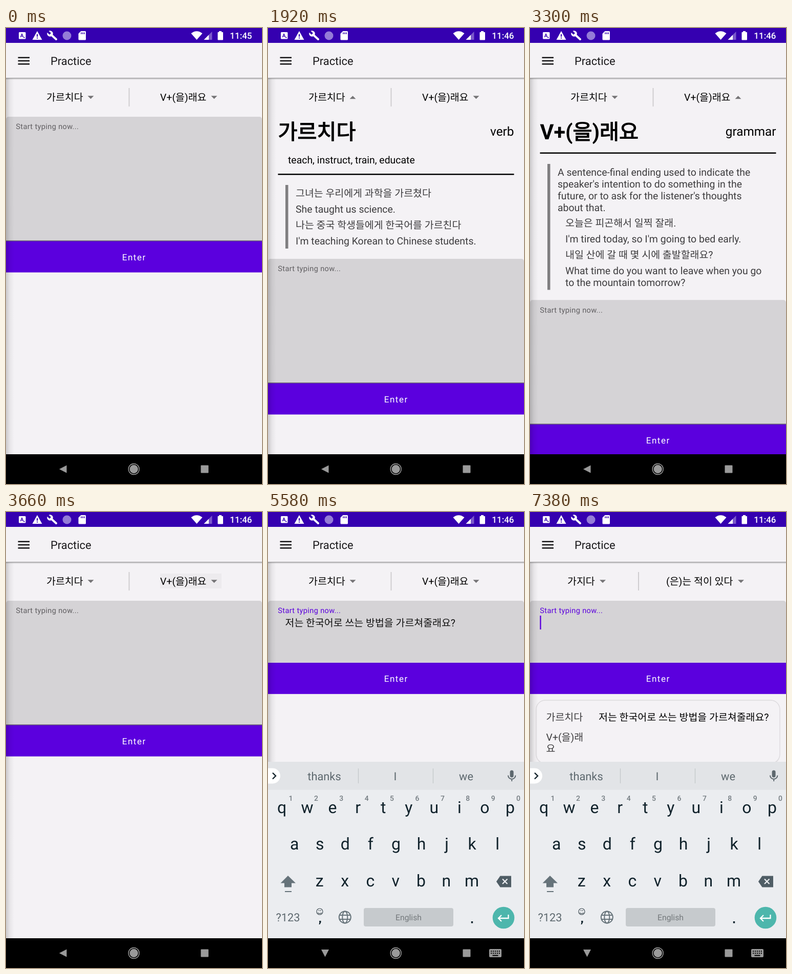
An HTML page that plays this animation: 500 px wide and 889 px high, repeating every 7440 ms.

```html
<!DOCTYPE html>
<html lang="ko">
<head>
<meta charset="utf-8">
<title>Practice</title>
<style>
  html, body { margin: 0; width: 100%; height: 100%; overflow: hidden; background: #f4f2f5; }
  svg { display: block; width: 500px; height: 889px; }
  text { font-family: Roboto, "Noto Sans CJK KR", "Noto Sans CJK", sans-serif; font-size: 19.44px;
         white-space: pre; text-rendering: geometricPrecision; }
  .head { font-size: 41.3px; font-weight: 700; }
  .head .ko { font-weight: 400; stroke: #000; stroke-width: 1.25px; }
  .kind { font-size: 24.3px; text-anchor: end; }
  .soft { fill: #3d3c3e; }
  .label { font-size: 14.58px; letter-spacing: .35px; }
  .enter { font-size: 17px; letter-spacing: 1.5px; fill: #fff; }
  .mid { text-anchor: middle; }
  .key { font-size: 32px; fill: #10222b; }
  .hint { font-size: 14px; font-weight: 500; fill: #737b80; }
  .word { font-size: 21.8px; fill: #5d686e; }
</style>
</head>
<body>
<svg viewBox="0 0 500 889" xmlns="http://www.w3.org/2000/svg">
  <defs>
    <linearGradient id="edge">
      <stop offset="0" stop-color="#000" stop-opacity=".17"/>
      <stop offset=".5" stop-color="#000" stop-opacity=".05"/>
      <stop offset="1" stop-color="#000" stop-opacity="0"/>
    </linearGradient>
    <linearGradient id="drop" x2="0" y2="1">
      <stop offset="0" stop-color="#000" stop-opacity=".36"/>
      <stop offset="1" stop-color="#000" stop-opacity="0"/>
    </linearGradient>
    <pattern id="dots" width="2" height="2" patternUnits="userSpaceOnUse">
      <rect width="2" height="2" fill="#8468d0"/>
      <rect width="1" height="1" fill="#c5b6ec"/>
    </pattern>
    <clipPath id="btnClip"><rect y="416" width="500" height="60.5"/></clipPath>
  </defs>

  <rect width="500" height="889" fill="#f4f2f5"/>

  <!-- selectors -->
  <rect id="tapL" x="79" y="120" width="101" height="29" fill="#000" opacity="0"/>
  <rect id="tapR" x="301" y="120" width="120" height="29" fill="#000" opacity="0"/>
  <text id="pickL" y="142"></text>
  <text id="pickR" y="142"></text>
  <path id="arrowL" d="M-6-3H6L0 3Z" fill="#757476"/>
  <path id="arrowR" d="M-6-3H6L0 3Z" fill="#757476"/>
  <rect id="split" y="117" width="2" height="36" fill="#cfcdd0"/>

  <g id="verb">
    <text class="head" x="19.5" y="216.5"><tspan class="ko">가르치다</tspan></text>
    <text class="kind" x="480.5" y="210">verb</text>
    <text x="39" y="264">teach, instruct, train, educate</text>
    <rect x="19.5" y="284" width="461" height="2.5"/>
    <rect x="34" y="306" width="5.5" height="124" fill="#807f81"/>
    <g class="soft" id="verbLines"></g>
  </g>

  <g id="grammar">
    <text class="head" x="19.5" y="216.5">V+(<tspan class="ko">을</tspan>)<tspan class="ko">래요</tspan></text>
    <text class="kind" x="480.5" y="210">grammar</text>
    <rect x="19.5" y="242.5" width="461" height="2.5"/>
    <rect x="34" y="265" width="5.5" height="245.5" fill="#807f81"/>
    <g class="soft" id="grammarLines"></g>
  </g>

  <!-- answer card -->
  <g id="card">
    <rect x="12" y="368" width="476" height="124" rx="18" fill="#000" opacity=".07"/>
    <rect x="12" y="367" width="476" height="123" rx="18" fill="#f4f2f5" stroke="#dddbde" stroke-width="1.4"/>
    <g class="soft">
      <text x="31.5" y="407">가르치다</text>
      <text x="31.5" y="446">V+(을)래</text>
      <text x="31.5" y="468">요</text>
    </g>
    <text x="134" y="407" id="answer"></text>
  </g>

  <!-- input and button -->
  <g id="field">
    <path id="box" fill="#d5d3d6"/>
    <rect id="rule" y="414" width="500" height="1.8" fill="#7b797c"/>
    <text class="label" id="label" x="19.3" y="197.3">Start typing now...</text>
    <text id="typed" x="33.5" y="222.5" fill="#111"></text>
    <rect id="caret" y="202" width="2.4" height="27" fill="#5b00dd"/>
  </g>
  <g id="button">
    <rect y="415.5" width="500" height="61" fill="#5b00de"/>
    <rect y="415.5" width="500" height="1" fill="#000" opacity=".15"/>
    <g clip-path="url(#btnClip)"><circle id="ripple" cx="250" cy="446" fill="#fff" opacity="0"/></g>
    <text class="enter" x="226.8" y="453">Enter</text>
  </g>

  <rect y="98" width="16" height="733" fill="url(#edge)"/>

  <!-- toolbar -->
  <rect y="97" width="500" height="4" fill="url(#drop)"/>
  <rect y="29" width="500" height="68" fill="#f4f2f5"/>
  <path d="M23.5 57.7H46M23.5 64H46M23.5 70.3H46" stroke="#151416" stroke-width="2.4"/>
  <text x="87" y="72" style="font-size:21.87px" fill="#1a191b">Practice</text>

  <!-- keyboard -->
  <g id="keys">
    <rect y="487" width="500" height="344" fill="#ebedf0"/>
    <rect y="487" width="500" height="54.5" fill="#e2e4e7"/>
    <path d="M0 499.5H9a15 15 0 0 1 0 30H0Z" fill="#fff"/>
    <path d="M9 508.500l6 6-6 6" fill="none" stroke="#15252d" stroke-width="2.4"/>
    <path d="M176.500 500V529M322.500 500V529" stroke="#c3c7ca" stroke-width="1.3"/>
    <g class="word mid">
      <text x="110" y="523" style="font-size:inherit">thanks</text>
      <text x="248.500" y="523" style="font-size:inherit">I</text>
      <text x="387" y="523" style="font-size:inherit">we</text>
      <text x="39" y="798" style="font-size:inherit">?123</text>
    </g>
    <rect x="472.600" y="503.500" width="7" height="14" rx="3.500" fill="#5d686e"/>
    <path d="M469 513.500a7.200 7.200 0 0 0 14.400 0M476.200 521V525" fill="none" stroke="#5d686e" stroke-width="2"/>
    <g id="letters"></g>
    <path d="M39 709L54 723.500H46V731.500H32V723.500H24.500Z" fill="#66737a"/>
    <rect x="33" y="739" width="13" height="2" fill="#66737a"/>
    <path d="M453.500 709.500H475V731.500H453.500L446 720.500Z" fill="#4f5d65"/>
    <path d="M458 715.500l9.500 9.500M467.500 715.500l-9.500 9.500" stroke="#ebedf0" stroke-width="2.300"/>
    <g fill="none" stroke="#3f4c53" stroke-width="1.200">
      <circle cx="101" cy="779" r="6"/>
      <path d="M97.500 781a3.800 3.200 0 0 0 7 0"/>
    </g>
    <path d="M98.800 776.200h1.500v1.700h-1.500zM102 776.200h1.500v1.700h-1.500z" fill="#3f4c53"/>
    <path d="M100 797h3.500v3l-2.200 4h-1.800l.9-3.500z" fill="#10222b"/>
    <g fill="none" stroke="#66737a" stroke-width="2">
      <circle cx="150.300" cy="790" r="11.500"/>
      <ellipse cx="150.300" cy="790" rx="5" ry="11.500"/>
      <path d="M140 786H160.600M140 794H160.600"/>
    </g>
    <rect x="187" y="772" width="175" height="36" rx="4" fill="#c6cacd"/>
    <text class="mid" x="274.500" y="796" style="font-size:15.8px" fill="#74797c">English</text>
    <rect x="396.800" y="798" width="3.400" height="3.600" fill="#10222b"/>
    <circle cx="460" cy="791" r="21.300" fill="#4db6ac"/>
    <path d="M469.500 785V792H450.500M456 786l-6 6 6 6" fill="none" stroke="#fff" stroke-width="2.300"/>
  </g>

  <!-- navigation bar -->
  <rect y="831" width="500" height="58" fill="#000"/>
  <path id="back" d="M104 860L118.500 852.500V867.500Z" fill="#9a9a9a"/>
  <circle cx="249.700" cy="860" r="8.200" fill="#9a9a9a"/>
  <circle cx="249.700" cy="860" r="10.500" fill="none" stroke="#a6a6a6" stroke-width="1.300"/>
  <rect x="380.500" y="852.500" width="15" height="15" rx="1" fill="#9a9a9a"/>
  <g id="navKeys">
    <rect x="432" y="852" width="24" height="16" rx="2" fill="#9a9a9a"/>
    <path d="M435 856.300H453M435 860.200H453" stroke="#000" stroke-width="2" stroke-dasharray="2.200 1.750"/>
    <path d="M438.500 864.600H449.500" stroke="#000" stroke-width="2"/>
  </g>

  <!-- status bar -->
  <rect width="500" height="29" fill="#3500b0"/>
  <rect x="25" y="8" width="13.500" height="13.500" rx="1.500" fill="#fff"/>
  <text class="mid" x="31" y="18" style="font-size:10px;font-weight:700" fill="#3500b0">A</text>
  <path d="M34 18.500h3" stroke="#3500b0" stroke-width="1.300"/>
  <path d="M61 6L70.500 23H51.500Z" fill="#fff"/>
  <path d="M61 12V17M61 18.500V20.500" stroke="#3500b0" stroke-width="2"/>
  <path d="M87 12L98 22" stroke="#fff" stroke-width="4" stroke-linecap="round"/>
  <circle cx="86" cy="11" r="5.800" fill="#fff"/>
  <path d="M79 7.500L82 4.500L88 10L85 13Z" fill="#3500b0"/>
  <circle cx="119" cy="15" r="8.500" fill="url(#dots)"/>
  <path d="M146.500 6H154.500a1.500 1.500 0 0 1 1.500 1.500V22a1.500 1.500 0 0 1-1.500 1.500H143a1.500 1.500 0 0 1-1.500-1.500V11Z" fill="#fff"/>
  <path d="M147 8.500V12M150 8.500V12M153 8.500V12" stroke="#3500b0" stroke-width="1.500"/>
  <path d="M361.500 10.500Q372.500 2 383.500 10.500L372.500 23Z" fill="#fff"/>
  <path d="M402.500 7V23H386.500Z" fill="#fff" opacity=".35"/>
  <path d="M396 13.500V23H386.500Z" fill="#fff"/>
  <path d="M416 6H421V8H423a1 1 0 0 1 1 1V22.500a1 1 0 0 1-1 1H414.500a1 1 0 0 1-1-1V9a1 1 0 0 1 1-1H416Z" fill="#fff"/>
  <text id="clock" x="480.500" y="21" text-anchor="end" style="font-size:17px;font-weight:500" fill="#fff"></text>
</svg>

<script>
const LOOP = 7440, STEP = 60;
const SENTENCE = "저는 한국어로 쓰는 방법을 가르쳐줄래요?";
const AT = {
  clock: 720, verbOpen: 1200, verbShut: 2100, gramOpen: 2220, gramShut: 3480,
  focus: 4140, keysUp: 4260, type: 4680, typed: 5340, press: 6060, commit: 6240
};

const $ = id => document.getElementById(id);
const set = (id, attrs) => { for (const k in attrs) $(id).setAttribute(k, attrs[k]); };
const show = (id, on) => { $(id).style.display = on ? "" : "none"; };
const write = (id, s) => { if ($(id).textContent !== s) $(id).textContent = s; };
const clamp = v => Math.max(0, Math.min(1, v));
const line = ([x, y, s]) => `<text x="${x}" y="${y}">${s}</text>`;

$("verbLines").innerHTML = [
  [54, 329, "그녀는 우리에게 과학을 가르쳤다"],
  [54, 360, "She taught us science."],
  [54, 391, "나는 중국 학생들에게 한국어를 가르친다"],
  [54, 422, "I'm teaching Korean to Chinese students."]
].map(line).join("");

$("grammarLines").innerHTML = [
  [54, 288, "A sentence-final ending used to indicate the"],
  [54, 311, "speaker's intention to do something in the"],
  [54, 333.7, "future, or to ask for the listener's thoughts"],
  [54, 356.5, "about that."],
  [69, 387, "오늘은 피곤해서 일찍 잘래."],
  [69, 418, "I'm tired today, so I'm going to bed early."],
  [69, 448.7, "내일 산에 갈 때 몇 시에 출발할래요?"],
  [69, 480.3, "What time do you want to leave when you go"],
  [69, 503, "to the mountain tomorrow?"]
].map(line).join("");

const rows = [["qwertyuiop", 27, 587], ["asdfghjkl", 51.7, 658], ["zxcvbnm", 100.7, 730]];
$("letters").innerHTML = rows.map(([s, x, y]) => [...s].map((c, i) =>
  `<text class="key mid" x="${x + i * 49.55}" y="${y}">${c}</text>`).join("")).join("") +
  [..."1234567890"].map((c, i) =>
    `<text class="hint mid" x="${44.500 + i * 49.4}" y="562.500">${c}</text>`).join("");

write("answer", SENTENCE);

// Brief touch highlight that fades out.
const tap = (t, start) => t < start ? 0 : .08 * (1 - clamp((t - start) / 360));

function pickers(left, right, lx, rx, ax, bx, split, upL, upR) {
  write("pickL", left);
  write("pickR", right);
  set("pickL", { x: lx });
  set("pickR", { x: rx });
  set("arrowL", { transform: `translate(${ax} 135.3) scale(1 ${upL ? -1 : 1})` });
  set("arrowR", { transform: `translate(${bx} 135.3) scale(1 ${upR ? -1 : 1})` });
  set("split", { x: split });
}

function draw(t) {
  const verb = t >= AT.verbOpen && t < AT.verbShut;
  const gram = t >= AT.gramOpen && t < AT.gramShut;
  const focus = t >= AT.focus, keys = t >= AT.keysUp, done = t >= AT.commit;

  write("clock", t < AT.clock ? "11:45" : "11:46");
  show("verb", verb);
  show("grammar", gram);
  show("card", done);
  set("tapL", { opacity: Math.max(tap(t, AT.verbOpen - 60), t < AT.verbShut - 60 ? 0 : tap(t, AT.verbShut - 60)) });
  set("tapR", { opacity: Math.max(t < AT.gramShut - 60 ? tap(t, AT.gramOpen - 60) : 0, tap(t, AT.gramShut - 60)) });

  if (done) pickers("가지다", "(은)는 적이 있다", 73, 266, 142, 412, 211, false, false);
  else pickers("가르치다", "V+(을)래요", 79, 301, 165.5, 406.5, 239.5, verb, gram);

  const drop = verb ? 277 : gram ? 357.3 : 0;
  const bottom = keys ? 293 : 415.5;
  set("field", { transform: `translate(0 ${drop})` });
  set("box", { d: `M0 ${bottom}V178a5 5 0 0 1 5-5H495a5 5 0 0 1 5 5V${bottom}Z` });
  show("rule", !keys);
  set("label", { fill: focus ? "#5b00dd" : "#605e61" });
  set("button", { transform: `translate(0 ${keys ? -121.7 : drop})` });

  const part = clamp((t - AT.type) / (AT.typed - AT.type));
  write("typed", done ? "" : SENTENCE.slice(0, Math.round(part * SENTENCE.length)));
  const caretX = done ? 19.3 : 33.3 + (part ? $("typed").getComputedTextLength() : 0);
  set("caret", { x: caretX });
  show("caret", focus && (t - AT.focus + 240) % 480 < 240);

  const wave = (t - AT.press) / 360;
  const live = wave >= 0 && wave < 1;
  set("ripple", { r: live ? 60 + 260 * wave : 0, opacity: live ? .24 * (1 - wave) : 0 });

  const rise = clamp((t - AT.focus + STEP) / 180);
  show("keys", focus);
  set("keys", { transform: `translate(0 ${344 * (1 - rise) ** 2})` });
  show("navKeys", focus);
  set("back", { transform: focus ? "rotate(-90 111.500 860)" : "" });
}

function tick() {
  draw(Math.floor(performance.now() % LOOP / STEP) * STEP);
  requestAnimationFrame(tick);
}
tick();
</script>
</body>
</html>
```
